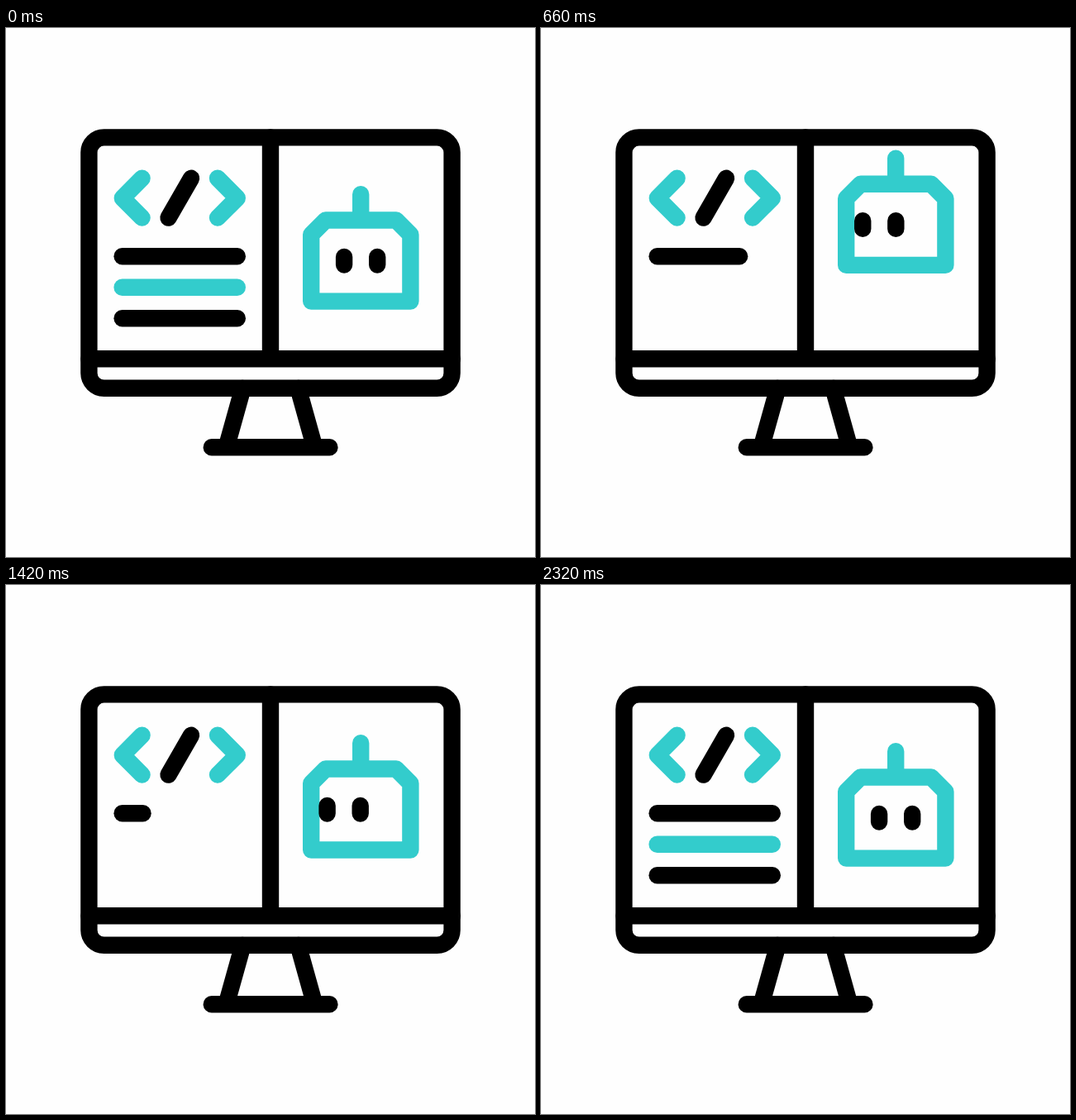
Recreate the animation shown at these times as an HTML page. Size 640 by 640 pixels, loop 2.4 s.

```html
<!DOCTYPE html>
<html lang="en">
<head>
<meta charset="utf-8">
<title>Coding robot</title>
<style>
html, body { margin: 0; width: 100%; height: 100%; overflow: hidden; background: #fefefe; }
svg { display: block; width: 100%; height: 100%; }
g { fill: none; stroke: #000; stroke-width: 20.4; stroke-linecap: round; stroke-linejoin: round; }
.teal { stroke: #33cccc; }
</style>
</head>
<body>
<svg viewBox="0 0 640 640">
  <g>
    <rect x="100.4" y="132.4" width="439.2" height="303.4" rx="18.2"/>
    <path d="M320 132.4V400.2M100.4 400.2H539.8"/>
    <path d="M286.5 436L266.6 507.3M353.5 436L373.4 507.3M248.8 507.3H391.4"/>
    <path class="teal" d="M164.6 181.8L140.8 205.7L164.6 229.6M256 181.8L279.8 205.7L256 229.6"/>
    <path d="M224 181.8L196.5 229.6"/>
    <path class="row"/>
    <path class="row teal"/>
    <path class="row"/>
    <g id="robot">
      <path class="teal" d="M369.2 250L386.7 232.5H472L489.4 250V330.6H369.2ZM429.2 201.3V232.4"/>
      <path id="eyes" d="M409.1 277V286.6M449.2 277V286.6"/>
    </g>
  </g>
</svg>
<script>
const LOOP = 2400, STEP = 20;
const LEFT = 140.6, ROW = 139.2;
const rows = [...document.querySelectorAll('.row')];
const robot = document.getElementById('robot');
const eyes = document.getElementById('eyes');

// Cubic easing with handles (x1, 0) and (x2, 1), solved by bisection.
function ease(x1, x2) {
  return (t, from, to) => {
    const u = (t - from) / (to - from);
    if (u <= 0) return 0;
    if (u >= 1) return 1;
    let lo = 0, hi = 1, s = 0.5;
    for (let i = 0; i < 24; i++) {
      s = (lo + hi) / 2;
      const r = 1 - s;
      const x = 3 * r * r * s * x1 + 3 * r * s * s * x2 + s * s * s;
      if (x < u) lo = s; else hi = s;
    }
    return s * s * (3 - 2 * s);
  };
}

const soft = ease(0.333, 0.667);
const sink = ease(0.21, 0.62);
const snap = ease(0.089, 0.153);

function draw(t) {
  // The three rows are erased and retyped as one continuous line.
  const typed = 3 * ROW * (1 - snap(t, 280, 1220) + snap(t, 1386, 2222));
  rows.forEach((row, i) => {
    const len = Math.max(0, Math.min(ROW, typed - i * ROW));
    row.setAttribute('d', `M${LEFT} ${276.2 + i * 37.5}h${len}`);
    row.style.display = len > 0.05 ? '' : 'none';
  });

  const lift = 43.7 * (soft(t, 40, 660) - sink(t, 660, 1840));
  robot.setAttribute('transform', `translate(0 ${-lift})`);

  const look = 20.5 * (soft(t, 320, 700) - soft(t, 1880, 2300));
  eyes.setAttribute('transform', `translate(${-look} 0)`);
}

const start = performance.now();
function tick() {
  const t = (performance.now() - start) % LOOP;
  draw(Math.floor(t / STEP) * STEP);
  requestAnimationFrame(tick);
}
tick();
</script>
</body>
</html>
```
